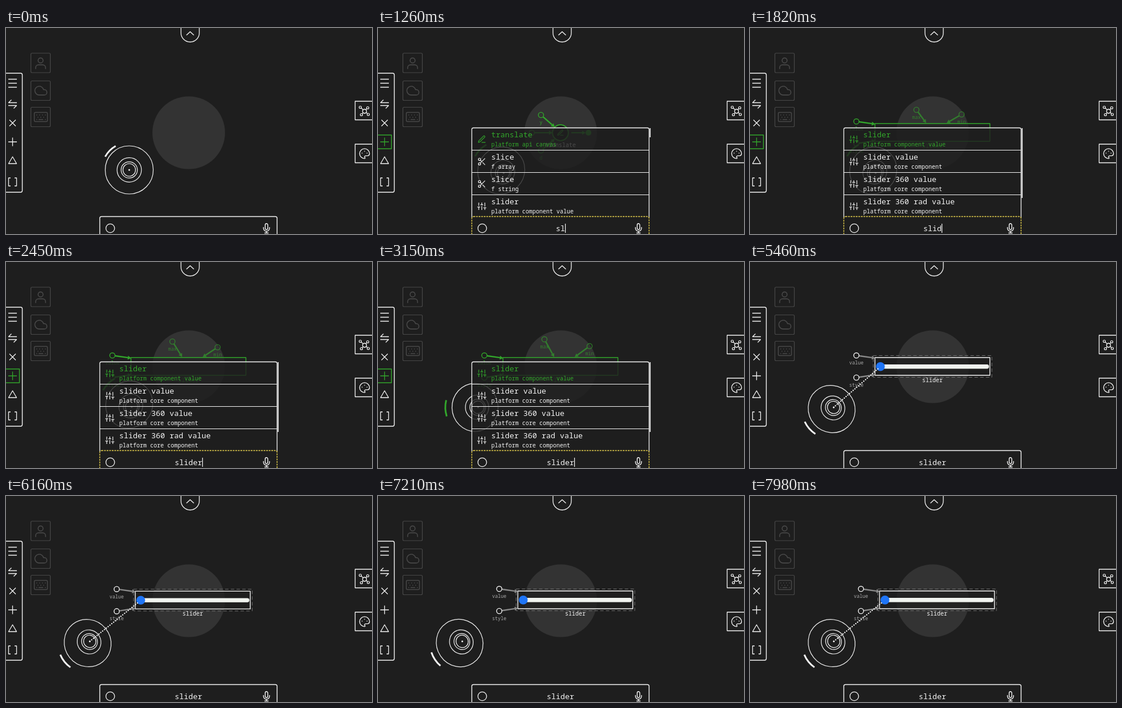
Animation of 640 by 360 pixels, one loop 8 s. Source, as an HTML page with a canvas:

```html
<!DOCTYPE html>
<html lang="en">
<head>
<meta charset="utf-8">
<title>Slider search</title>
<style>
  html, body { margin: 0; width: 100%; height: 100%; overflow: hidden; background: #1e1e1e; }
  canvas { display: block; width: 100vw; height: 100vh; }
</style>
</head>
<body>
<canvas id="stage" width="640" height="360"></canvas>
<script>
const ctx = document.getElementById('stage').getContext('2d');
const LOOP = 8000, STEP = 70, TAU = Math.PI * 2;
const BG = '#1e1e1e', WHITE = '#f4f4f4', GREEN = '#32a62b', DIM = '#484848', GRAY = '#8a8a8a', MARK = '#333';
const OPEN = 280, TYPE = 1050, KEY_GAP = 210, PICK = 3570;

const ICONS = {
  user: 'M3 22v-2a5 5 0 0 1 5-5h8a5 5 0 0 1 5 5v2M16.5 7a4.5 4.5 0 1 1-9 0a4.5 4.5 0 1 1 9 0',
  cloud: 'M18 10h-1.26A8 8 0 1 0 9 20h9a5 5 0 0 0 0-10z',
  sliders: 'M4 21v-7M4 10V3M12 21v-9M12 8V3M20 21v-5M20 12V3M1 14h6M9 8h6M17 16h6',
  scissors: 'M9 6a3 3 0 1 1-6 0a3 3 0 1 1 6 0M9 18a3 3 0 1 1-6 0a3 3 0 1 1 6 0M20 4L8.1 15.9M14.5 14.5L20 20M8.1 8.1L12 12',
  pencil: 'M12 20h9M16.5 3.5a2.1 2.1 0 0 1 3 3L7 19l-4 1 1-4z',
  mic: 'M12 1a3 3 0 0 0-3 3v8a3 3 0 0 0 6 0V4a3 3 0 0 0-3-3zM19 10v2a7 7 0 0 1-14 0v-2M12 19v4M8 23h8',
  palette: 'M12 21a9 9 0 1 1 9-9c0 2.5-2 4-4.5 4H14a2 2 0 0 0-1 3.75A1.3 1.3 0 0 1 12 21M7.5 11v.3M12 7.500v.3M16.5 11v.3'
};
for (const name in ICONS) ICONS[name] = new Path2D(ICONS[name]);

const UNITS = [
  ['pencil', 'translate', 'platform api canvas'],
  ['scissors', 'slice', 'f array'],
  ['scissors', 'slice', 'f string'],
  ['sliders', 'slider', 'platform component value'],
  ['sliders', 'slider value', 'platform core component'],
  ['sliders', 'slider 360 value', 'platform core component'],
  ['sliders', 'slider 360 rad value', 'platform core component']
];

const within = (t, from, to) => t >= from && t < to;
const mix = (a, b, k) => a + (b - a) * k;
const mixPoint = (p, q, k) => [mix(p[0], q[0], k), mix(p[1], q[1], k)];
function ease(t, from, to) {
  const k = Math.min(1, Math.max(0, (t - from) / (to - from)));
  return (1 - Math.cos(k * Math.PI)) / 2;
}

function paint(path, stroke, width = 1.3, fill) {
  const p = typeof path === 'string' ? new Path2D(path) : path;
  if (fill) { ctx.fillStyle = fill; ctx.fill(p); }
  if (stroke) { ctx.strokeStyle = stroke; ctx.lineWidth = width; ctx.stroke(p); }
}
function circle(x, y, r, stroke, width, fill) {
  const p = new Path2D();
  p.arc(x, y, r, 0, TAU);
  paint(p, stroke, width, fill);
}
function box(x, y, w, h, r, stroke, width, fill) {
  const p = new Path2D();
  p.roundRect(x, y, w, h, r);
  paint(p, stroke, width, fill);
}
function icon(name, x, y, size, color, width = 1.4) {
  const k = size / 24;
  ctx.save();
  ctx.lineCap = 'round';
  ctx.translate(x - size / 2, y - size / 2);
  ctx.scale(k, k);
  paint(ICONS[name], color, width / k);
  ctx.restore();
}
function text(str, x, y, advance, color, align = 'left') {
  ctx.font = `${advance / 0.6}px "Noto Sans Mono", "DejaVu Sans Mono", monospace`;
  ctx.textAlign = align;
  ctx.fillStyle = color;
  ctx.fillText(str, x, y);
}
function link(x1, y1, x2, y2, color, width = 2.2) {
  const a = Math.atan2(y2 - y1, x2 - x1), c = Math.cos(a), s = Math.sin(a);
  const bx = x2 - c * 6, by = y2 - s * 6;
  paint(`M${x1 + c * 5} ${y1 + s * 5}L${bx} ${by}`, color, width);
  paint(`M${x2} ${y2}L${bx - s * 3.5} ${by + c * 3.5}L${bx + s * 3.5} ${by - c * 3.5}Z`, null, 0, color);
}
function pin(label, x, y, tx, ty, stroke, color = stroke, labelColor = color) {
  link(x, y, tx, ty, color, 2.4);
  circle(x, y, 4.6, stroke, 1.4);
  text(label, x, y + 16, 5, labelColor, 'center');
}

function drawTools(active) {
  [44, 92.5, 138.5].forEach(y => box(43.5, y, 34, 34, 2, DIM, 1.2));
  icon('user', 60.5, 61.5, 23, DIM, 1.6);
  icon('cloud', 61, 109.5, 23, DIM, 1.6);
  box(49.5, 147.5, 23, 16, 2, DIM, 1.5);
  paint('M53 152h1.5M58 152h1.5M63 152h1.5M68 152h1.5M55 156h1.5M60 156h1.5M65 156h1.5M53 160h1.5M57 160h8M68 160h1.5', DIM, 1.3);

  box(-6, 79, 34.5, 208, 3, WHITE, 1.4, BG);
  if (active) box(-3, 187, 26.5, 24, 0, GREEN, 1.4);
  paint('M4 89.5h15M4 96.5h15M4 103.5h15', WHITE);
  paint('M19 130.5H4.5l5-5M4 135.5h14.5l-5 5', WHITE);
  paint('M6 160.5l11 11M17 160.5l-11 11', WHITE);
  paint('M4 199h15M11.5 191.5v15', active ? GREEN : WHITE);
  paint('M11.5 225l7 12h-14z', WHITE);
  paint('M8 262H4.5v14H8M15 262h3.5v14H15', WHITE);

  paint('M306 -2V8.5a16 16 0 0 0 32 0V-2', WHITE, 1.3, BG);
  paint('M315.5 12.5l6.5-6 6.5 6', WHITE, 1.4);

  [128, 203].forEach(y => box(610.5, y, 36, 32.5, 0, WHITE, 1.3, BG));
  for (const [x, y] of [[619.5, 138.5], [632.5, 139.5], [633.5, 151], [621.5, 151.5]]) {
    paint(`M627 145L${x} ${y}`, WHITE, 1.2);
    circle(x, y, 2, WHITE, 1.2, BG);
  }
  circle(627, 145.5, 3.5, WHITE, 1.4, BG);
  icon('palette', 627, 219.5, 23, WHITE);
}

function drawUnitPreview([glyph, name], hasInputs) {
  link(269, 183, 305, 183, GREEN);
  circle(269, 183, 4.6, GREEN, 1.4);
  link(333, 183, 363, 183, GREEN);
  circle(368, 183, 5, null, 0, GREEN);
  if (hasInputs) {
    pin('y', 285, 152, 309, 173, GREEN);
    pin('d', 285, 214, 309, 194, GREEN);
  }
  circle(319, 183, 13.8, GREEN, 1.8, BG);
  icon(glyph, 319, 183, 13, GREEN, 1.3);
  text(name, 319, 208, 6, WHITE, 'center');
}

function drawSliderUnit(stroke, color, labelColor, fill) {
  box(218.5, 167, 201, 31, 0, stroke, 1.4, fill);
  pin('value', 186, 163.3, 219, 168, stroke, color, labelColor);
  pin('style', 186, 202, 219, 197, stroke, color, labelColor);
  text('slider', 319, 210, 6, stroke, 'center');
}

function drawSliderPreview(t) {
  const bob = 4 * Math.sin((t - 2450) / 400);
  ctx.globalAlpha = 0.65;
  pin('max', 291, 139 - bob, 308, 166, GREEN);
  pin('min', 370, 149 - bob / 2, 344, 166, GREEN);
  ctx.globalAlpha = 1;
  drawSliderUnit(GREEN, GREEN, GREEN, 'rgba(30,30,30,.6)');
}

function drawSlider(dx, dy) {
  ctx.save();
  ctx.translate(dx, dy);
  ctx.setLineDash([6, 4]);
  box(215.5, 163.5, 207.5, 38, 0, '#707070', 1);
  ctx.setLineDash([]);
  drawSliderUnit(WHITE, GRAY, '#a8a8a8', 'rgba(30,30,30,.75)');
  box(224, 179, 194, 7.4, 3.7, null, 0, '#f1f4f0');
  circle(228, 182.7, 7.7, null, 0, '#1f75f7');
  ctx.restore();
}

// The joystick leans toward its target; the marker arc sits on the far side.
function drawJoystick(t, thumb, color) {
  const travel = ease(t, 2660, 3500), press = t < OPEN ? 0 : 1;
  const [x, y] = mixPoint([215.5, 248 + press], [142.8, 257], travel);
  const row = mixPoint([319, 350], [291, 191], travel);
  const target = mixPoint(row, thumb, ease(t, 4270, 5040));
  const aim = Math.atan2(target[1] - y, target[0] - x);
  const lean = 0.041 * press * Math.hypot(target[0] - x, target[1] - y);
  const along = d => [x + Math.cos(aim) * d, y + Math.sin(aim) * d];

  [[42, 0], [21.3, 0.65], [14.2, 0.85], [11, 0.95]].forEach(([r, pull]) => {
    const ring = new Path2D();
    ring.ellipse(...along(lean * pull), r * (1 - 0.04 * press), r, aim, 0, TAU);
    paint(ring, WHITE, 1.2);
  });
  const knob = along(lean);
  circle(...knob, 1.5, null, 0, WHITE);
  const arc = new Path2D(), back = aim + Math.PI;
  arc.arc(x, y, press ? 52 : 48, back - 0.275, back + 0.275);
  paint(arc, color, 3);

  const linked = within(t, PICK, 3850) || within(t, 4830, 5040) || within(t, 5250, 7210) || t >= 7280;
  if (!linked) return;
  ctx.save();
  ctx.lineCap = 'round';
  ctx.setLineDash([0.1, 4]);
  paint(`M${knob}L${mixPoint(knob, target, 0.96)}`, WHITE, 2.3);
  ctx.restore();
}

function drawResults(rows, scroll) {
  box(164, 174.5, 310, 158, 3, WHITE, 1.3, 'rgba(30,30,30,.8)');
  rows.forEach(([glyph, name, tags], i) => {
    const y = 174.5 + i * 39, color = i ? WHITE : GREEN;
    if (i) paint(`M164 ${y}H474`, WHITE, 1.2);
    icon(glyph, 181.5, y + 20, 16, color, 1.2);
    text(name, 198, y + 16.5, 8, color);
    text(tags, 198, y + 32.5, 6, color);
  });
  ctx.fillStyle = WHITE;
  ctx.fillRect(475, 175, 1.6, scroll);
}

function drawSearch(query, focused, caret) {
  if (focused) ctx.setLineDash([3, 1.5]);
  box(164, 329.5, 310, 40, 3, focused ? '#e5d04c' : WHITE, 1.4, BG);
  ctx.setLineDash([]);
  circle(182.3, 350, 7.6, WHITE, 1.3);
  icon('mic', 455.5, 350, 18, WHITE);
  text(query, 319, 354.5, 8, WHITE, 'center');
  if (caret) {
    ctx.fillStyle = WHITE;
    ctx.fillRect(319 + query.length * 4, 342, 1.2, 16);
  }
}

function draw(time) {
  const t = Math.floor(time / STEP) * STEP;
  const searching = within(t, OPEN, PICK);
  const typed = Math.min(6, Math.max(0, Math.floor((t - TYPE) / KEY_GAP) + 1));
  const sliderFirst = typed > 3;
  const first = sliderFirst ? 3 : typed === 3 ? 1 : 0;
  const dx = 26 * ease(t, 5880, 6650) - 18 * ease(t, 7420, 7980);
  const dy = -ease(t, 5880, 6370);

  ctx.fillStyle = BG;
  ctx.fillRect(0, 0, 640, 360);
  circle(319.5, 183, 63.5, null, 0, MARK);

  if (t >= PICK) drawSlider(dx, dy);
  else if (searching && sliderFirst) drawSliderPreview(t);
  else if (searching) drawUnitPreview(UNITS[first], typed > 0);
  drawJoystick(t, [228 + dx, 183 + dy], searching ? GREEN : WHITE);
  if (searching) drawResults(UNITS.slice(first, first + 4), sliderFirst ? 122 : 16);
  drawTools(searching);
  drawSearch('slider'.slice(0, typed), searching, searching && !within(t, 700, TYPE));
}

function frame(now) {
  draw(now % LOOP);
  requestAnimationFrame(frame);
}
ctx.lineJoin = 'round';
draw(0);
requestAnimationFrame(frame);
</script>
</body>
</html>
```
